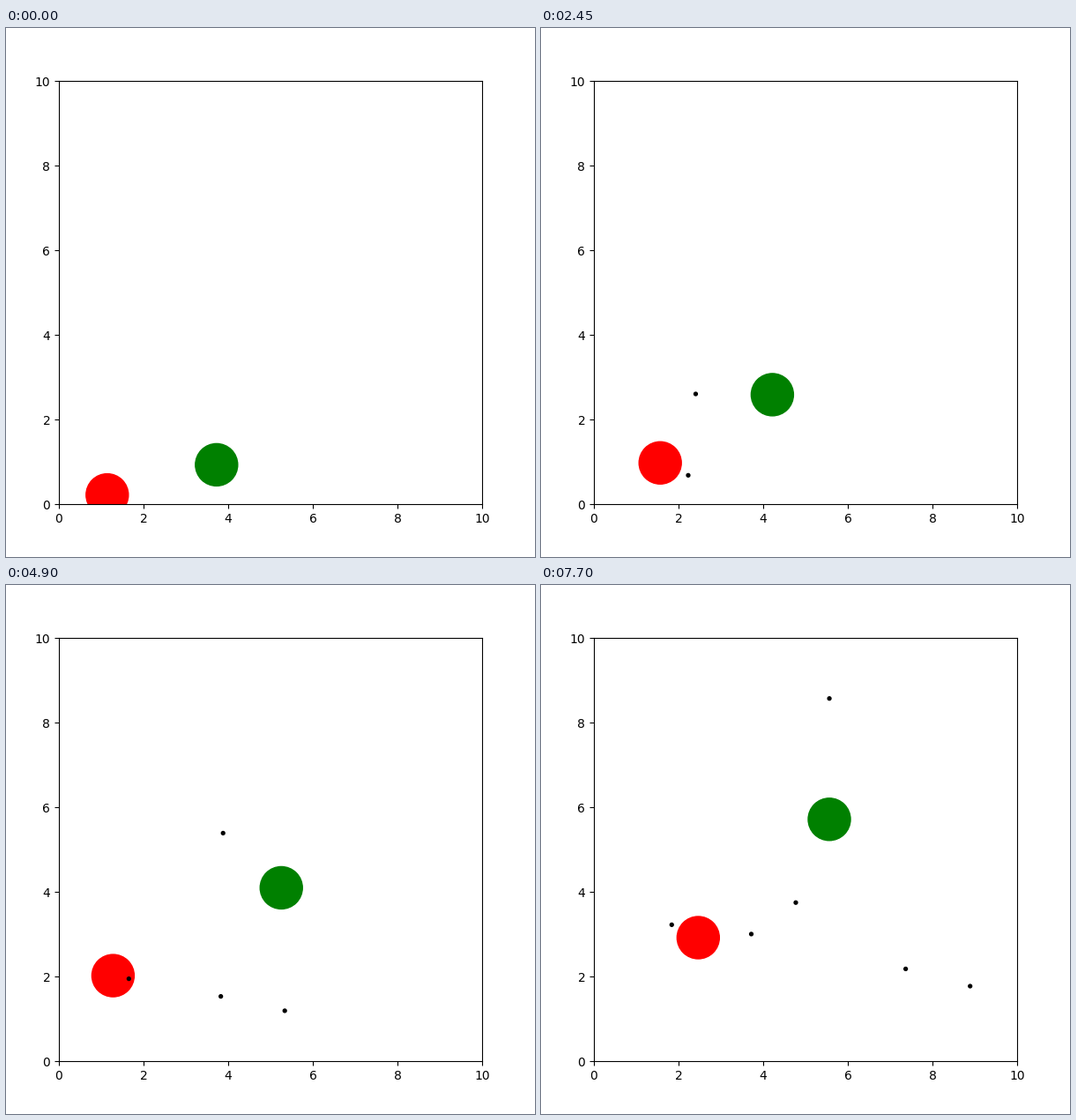
Recreate the animation shown at these times as a matplotlib script. Size 600x600 px, loop 8000 ms.

```python
import numpy as np
import matplotlib.pyplot as plt
from matplotlib.animation import FuncAnimation
from matplotlib.patches import Circle

TICK = 50            # ms per drawn frame
TICKS_PER_STEP = 7   # the scene advances every 350 ms
LOOP = 8000
SPEED = 0.45         # bullet travel per step
RELOAD = 4           # steps between shots
ANGLES = np.radians([62.1, 9.3, 10.4, 30.0, 17.7, 137.0])

# Turning points: step, x, y
RED = [(0, 1.142, 0.217), (3, 1.208, 0.395), (5, 1.473, 0.675),
       (9, 1.66, 1.272), (13, 1.131, 1.87), (20, 2.168, 2.915),
       (22, 2.465, 2.917)]
GREEN = [(0, 3.725, 0.929), (2, 3.792, 1.423), (5, 4.25, 2.156),
         (9, 4.183, 3.015), (13, 5.1, 3.87), (15, 5.41, 4.32),
         (19, 5.575, 5.298), (22, 5.563, 5.713)]


def along(route, step):
    """Position on a route of straight legs, each walked at even speed."""
    steps, xs, ys = zip(*route)
    return np.interp(step, steps, xs), np.interp(step, steps, ys)


def disc(radius, color):
    return ax.add_patch(Circle((0, 0), radius, color=color))


fig = plt.figure(figsize=(6, 6), dpi=100)
ax = fig.add_axes([0.1, 0.1, 0.8, 0.8])
ax.set_xlim(0, 10)
ax.set_ylim(0, 10)

red = disc(0.5, "red")
green = disc(0.5, "green")
bullets = [disc(0.04, "black") for _ in ANGLES]


def update(frame):
    step = frame // TICKS_PER_STEP
    red.center = along(RED, step)
    green.center = along(GREEN, step)
    for i, (bullet, angle) in enumerate(zip(bullets, ANGLES)):
        fired = i * RELOAD
        x, y = along(RED, fired)
        dist = SPEED * (step - fired - 1)
        bullet.center = x + dist * np.cos(angle), y + dist * np.sin(angle)
        bullet.set_visible(step > fired)
    return [red, green, *bullets]


anim = FuncAnimation(fig, update, frames=LOOP // TICK, interval=TICK,
                     repeat=True, repeat_delay=0)
plt.show()
```
